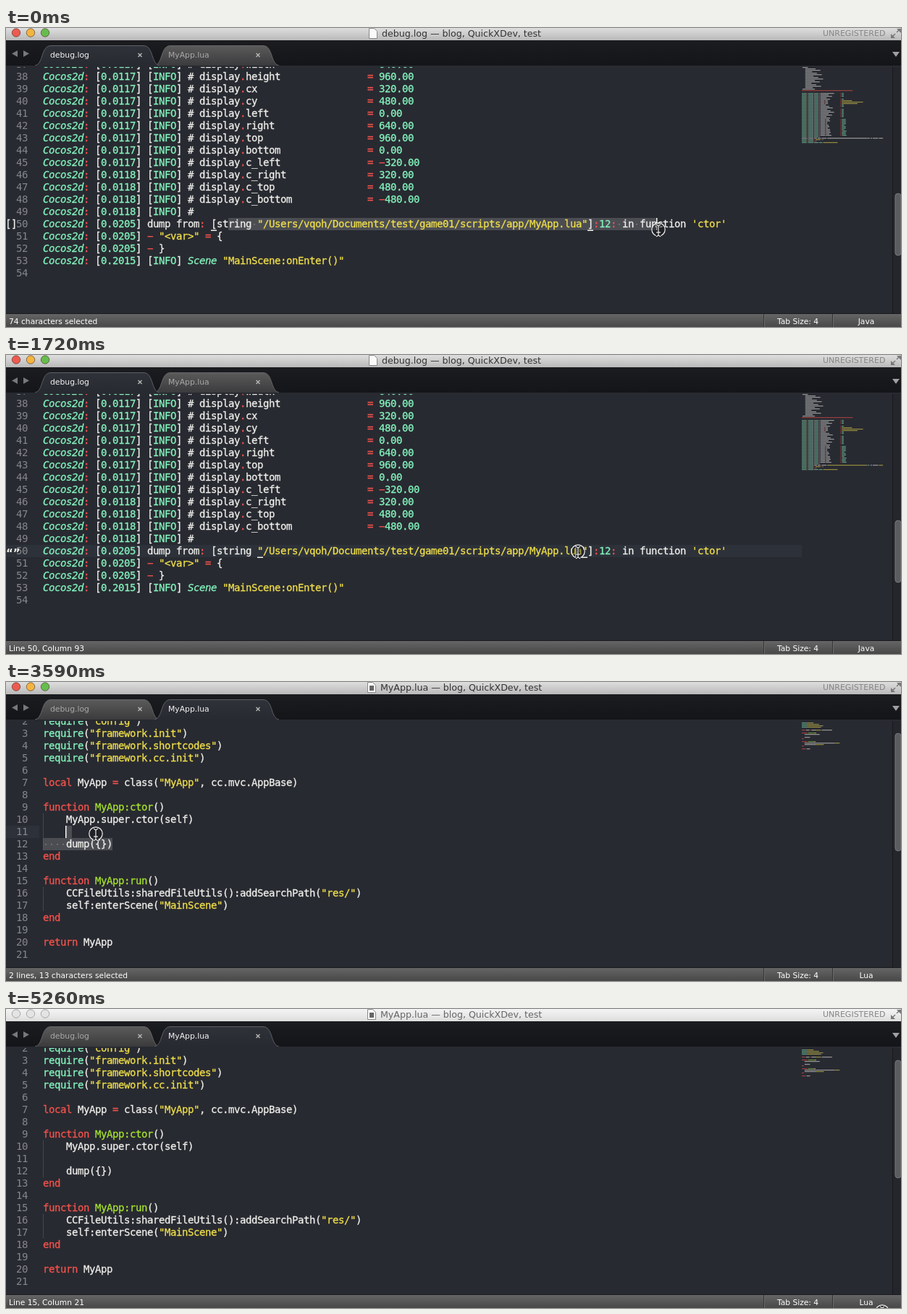
Recreate the animation shown at these times as an HTML page with a canvas. Size 1236x414 px, loop 5360 ms.

```html
<!DOCTYPE html>
<html lang="en">
<head>
<meta charset="utf-8">
<title>Editor: jump from log to code</title>
<style>
  html, body { margin: 0; width: 100%; height: 100%; overflow: hidden; background: #282a31; }
  canvas { display: block; }
</style>
</head>
<body>
<canvas id="stage" width="1236" height="414"></canvas>
<script>
const ctx = document.getElementById('stage').getContext('2d');
const LOOP = 5360, LEFT = 51, CHAR = 8, LINE = 17;
const MONO = '"DejaVu Sans Mono", monospace', UI = '"DejaVu Sans", sans-serif';
const BG = '#282a31', WHITE = '#eeeeea', RED = '#f2524b', MINT = '#83f3bd', YELLOW = '#eedd4a', LIME = '#a6e22e';

// Documents
const logLine = (time, text) => `Cocos2d: [${time}] ${text}`;
const display = (time, key, value) => logLine(time, `[INFO] # display.${key}`).padEnd(56) + '= ' + value;

const logLines = [];
for (let i = 0; i < 16; i++) logLines.push(' '.repeat(i % 15 ? 5 : 1) + 'x'.repeat(8 + i * 7 % 19));
logLines.push('='.repeat(74), '');
for (let i = 18; i < 36; i++) {
  logLines.push(i > 22 && i < 26
    ? logLine('0.0116', '[INFO] # device.path').padEnd(56) + '= "' + 'x'.repeat(29 - (i % 3) * 8) + '"'
    : logLine('0.0116', '[INFO] # ' + 'x'.repeat(8 + i * 5 % 13)).padEnd(56) + (i % 7 ? '= 640' : ''));
}
logLines.push(
  display('0.0117', 'width', '640.00'),
  display('0.0117', 'height', '960.00'),
  display('0.0117', 'cx', '320.00'),
  display('0.0117', 'cy', '480.00'),
  display('0.0117', 'left', '0.00'),
  display('0.0117', 'right', '640.00'),
  display('0.0117', 'top', '960.00'),
  display('0.0117', 'bottom', '0.00'),
  display('0.0117', 'c_left', '−320.00'),
  display('0.0118', 'c_right', '320.00'),
  display('0.0118', 'c_top', '480.00'),
  display('0.0118', 'c_bottom', '−480.00'),
  logLine('0.0118', '[INFO] #'),
  logLine('0.0205', 'dump from: [string "/Users/vqoh/Documents/test/game01/scripts/app/MyApp.lua"]:12: in function \'ctor\''),
  logLine('0.0205', '− "<var>" = {'),
  logLine('0.0205', '− }'),
  logLine('0.2015', '[INFO] Scene "MainScene:onEnter()"'),
  '');

const luaLines = `
require("config")
require("framework.init")
require("framework.shortcodes")
require("framework.cc.init")

local MyApp = class("MyApp", cc.mvc.AppBase)

function MyApp:ctor()
    MyApp.super.ctor(self)
    
    dump({})
end

function MyApp:run()
    CCFileUtils:sharedFileUtils():addSearchPath("res/")
    self:enterScene("MainScene")
end

return MyApp
`.split('\n');

const LOG = {
  name: 'debug.log', syntax: 'Java', lines: logLines, first: 37, top: 50, thumb: [229, 86], titleX: 519,
  pattern: /("[^"]*"|'[^']*')|(^Cocos2d|Scene(?= ))|(INFO|\b\d+(?:\.\d+)?)|([:.=−]+)/g,
  styles: [YELLOW, MINT, MINT, RED], italic: 1, guides: []
};
const LUA = {
  name: 'MyApp.lua', syntax: 'Lua', lines: luaLines, first: 2, top: 54, thumb: [71, 163], titleX: 517,
  pattern: /("[^"]*")|(\brequire\b)|((?<=function )[\w:]+)|(\b(?:local|function|end|return)\b|=)/g,
  styles: [YELLOW, MINT, LIME, RED], italic: -1, guides: [[10, 12], [16, 17]]
};

function tokenize(line, file) {
  const tokens = [];
  let at = 0;
  const plain = end => { if (end > at) tokens.push({ col: at, text: line.slice(at, end), color: WHITE }); };
  for (const m of line.matchAll(file.pattern)) {
    const kind = m.slice(1).findIndex(Boolean);
    plain(m.index);
    tokens.push({ col: m.index, text: m[0], color: file.styles[kind], italic: kind === file.italic });
    at = m.index + m[0].length;
  }
  plain(line.length);
  return tokens;
}
for (const file of [LOG, LUA]) file.tokens = file.lines.map(line => tokenize(line, file));

// Timeline: each entry changes part of the state at its time
const at = (line, col) => ({ caret: [line, col], sel: [], active: line, status: `Line ${line}, Column ${col + 1}` });
const steps = [
  [0, { file: LOG, caret: [50, 106], sel: [], band: null, active: 0, pair: [29, 94], mark: '[]', press: true,
        pointer: 'beam', focus: true, caretAlpha: 1 }],
  [370, { press: false }],
  [900, { ...at(49, 26), band: [0, 1099], press: true }],
  [1020, { press: false }],
  [1660, { ...at(50, 92), pair: [37, 93], mark: '“”', press: true }],
  [1780, { press: false }],
  [2200, { ...at(50, 91), press: true }],
  [2370, { caret: [50, 93], sel: [[50, 90, 93]], band: null, active: 0, pointer: 'arrow', status: '3 characters selected' }],
  [2480, { ...at(12, 0), file: LUA, pair: [], mark: '', active: 0, press: false, pointer: 'beam', caretAlpha: .4 }],
  [2780, { band: [50, 779] }],
  [3420, { ...at(12, 12), band: [0, 1099], press: true, caretAlpha: 1 }],
  [3530, { caret: [11, 4], sel: [[11, 4, 5], [12, 0, 12]], band: null, active: 11, status: '2 lines, 13 characters selected' }],
  [3940, { caret: [12, 4], sel: [[12, 4, 12]], active: 12, status: '8 characters selected' }],
  [4110, { press: false }],
  [4570, { ...at(15, 20), band: [0, 1099], press: true }],
  [4680, { press: false }],
  [5160, { press: true }],
  [5260, { focus: false, band: null, active: 0, caretAlpha: 0 }]
];
const path = [
  [0, 901, 279], [60, 901, 279], [370, 1000, 277], [550, 1000, 277], [900, 851, 247], [1190, 851, 249],
  [1660, 790, 272], [1780, 790, 272], [2250, 768, 268], [2780, 768, 272], [3020, 234, 259], [3310, 160, 232],
  [3420, 150, 226], [3590, 124, 210], [3880, 92, 222], [4110, 86, 224], [4290, 86, 224], [4460, 367, 273],
  [4680, 390, 276], [4790, 1174, 402], [4850, 1174, 402], [5260, 1210, 419], [LOOP, 1210, 419]
];

function pointerAt(t) {
  const i = path.findIndex(p => p[0] > t);
  const [t0, x0, y0] = path[i - 1], [t1, x1, y1] = path[i];
  const u = (t - t0) / (t1 - t0);
  return [Math.round(x0 + (x1 - x0) * u), Math.round(y0 + (y1 - y0) * u)];
}

function stateAt(t) {
  const state = Object.assign({}, ...steps.filter(s => s[0] <= t).map(s => s[1]));
  state.mouse = pointerAt(t);
  if (t < 900) {
    const from = 32;
    const to = t < 370 ? Math.min(118, Math.round((state.mouse[0] - LEFT) / CHAR)) : 118;
    state.caret = [50, to];
    state.sel = [[50, from, to]];
    state.status = `${to - from} characters selected`;
  }
  return state;
}

// Drawing helpers
function rect(x, y, w, h, color) { ctx.fillStyle = color; ctx.fillRect(x, y, w, h); }
function vertical(y0, y1, ...colors) {
  const g = ctx.createLinearGradient(0, y0, 0, y1);
  colors.forEach((c, i) => g.addColorStop(i / (colors.length - 1), c));
  return g;
}
function label(text, x, y, size, color, align = 'left', font = UI, style = '') {
  ctx.font = `${style} ${size}px ${font}`;
  ctx.textAlign = align;
  ctx.fillStyle = color;
  ctx.fillText(text, x, y);
}
function code(text, x, y, color, italic) {
  ctx.letterSpacing = '-0.43px';
  label(text, x, y, 14, color, 'left', MONO, italic ? 'italic' : '');
  ctx.strokeStyle = color;
  ctx.lineWidth = .3;
  ctx.strokeText(text, x, y);
  ctx.letterSpacing = '0px';
}
function shape(points, fill, stroke, width = 1) {
  ctx.beginPath();
  points.forEach(([x, y]) => ctx.lineTo(x, y));
  ctx.closePath();
  if (fill) { ctx.fillStyle = fill; ctx.fill(); }
  if (stroke) { ctx.strokeStyle = stroke; ctx.lineWidth = width; ctx.stroke(); }
}
function strokeLine(x0, y0, x1, y1, color, width = 1) {
  ctx.beginPath();
  ctx.moveTo(x0, y0);
  ctx.lineTo(x1, y1);
  ctx.strokeStyle = color;
  ctx.lineWidth = width;
  ctx.stroke();
}

function drawTitle({ file, focus }) {
  rect(0, 0, 1236, 17, focus ? vertical(0, 17, '#dedede', '#b9b9b9') : vertical(0, 17, '#f4f4f4', '#dedede'));
  const lights = focus ? ['#ee5a50', '#f4b53f', '#66bd4e'] : ['#e4e4e4', '#e4e4e4', '#e4e4e4'];
  lights.forEach((color, i) => {
    ctx.beginPath();
    ctx.arc(14 + i * 20, 6.5, 5.7, 0, 7);
    ctx.fillStyle = color;
    ctx.fill();
    ctx.strokeStyle = focus ? 'rgba(70,40,30,.6)' : '#a5a5a5';
    ctx.lineWidth = 1;
    ctx.stroke();
  });
  const x = file.titleX - 17.5;
  shape([[x, .5], [x + 7, .5], [x + 11, 4.5], [x + 11, 14.5], [x, 14.5]], '#fafafa', '#888');
  if (file === LUA) rect(x + 2.5, 5, 6, 7, '#666');
  label(file.name + ' — blog, QuickXDev, test', file.titleX, 12, 12.6, focus ? '#333' : '#666');
  label('UNREGISTERED', 1128, 11, 11, '#858585');
  const gray = '#777';
  strokeLine(1223, 13, 1228, 8, gray, 1.5);
  strokeLine(1230, 6, 1235, 1, gray, 1.5);
  shape([[1222, 8], [1222, 14], [1228, 14]], gray);
  shape([[1230, 1], [1236, 1], [1236, 7]], gray);
}

function drawTab(x, w, name, textX, closeX, active) {
  ctx.beginPath();
  ctx.moveTo(x, 52);
  ctx.bezierCurveTo(x + 12, 50, x + 8, 24.5, x + 22, 24.5);
  ctx.lineTo(x + w - 22, 24.5);
  ctx.bezierCurveTo(x + w - 8, 24.5, x + w - 12, 50, x + w, 52);
  ctx.fillStyle = active ? vertical(24, 52, '#30323a', BG) : vertical(24, 52, '#5b5b5b', '#3b3b3d');
  ctx.fill();
  ctx.strokeStyle = active ? '#5e6067' : '#66666a';
  ctx.lineWidth = 1;
  ctx.stroke();
  label(name, textX, 41, 10.8, active ? '#f4f4f4' : '#a9a9a9');
  strokeLine(closeX - 2.5, 35, closeX + 2.5, 40, '#b5b5b5', 1.4);
  strokeLine(closeX + 2.5, 35, closeX - 2.5, 40, '#b5b5b5', 1.4);
}

function drawTabs({ file }) {
  rect(0, 17, 1236, 36, vertical(17, 53, '#1b1c20', '#141519'));
  const first = active => drawTab(40, 172, 'debug.log', 61, 185, active);
  const second = active => drawTab(205, 172, 'MyApp.lua', 224, 348, active);
  if (file === LOG) { second(false); first(true); } else { first(false); second(true); }
  rect(0, 52, 1236, 2, BG);
  shape([[8, 35.5], [16, 31], [16, 40]], '#77787a');
  shape([[32, 35.5], [24, 31], [24, 40]], '#77787a');
  shape([[1224, 33], [1234, 33], [1229, 40]], '#a0a0a0');
}

function drawMinimap({ file, sel }) {
  file.tokens.forEach((tokens, i) => {
    const selected = sel.some(s => s[0] === i + 1);
    for (const { col, text, color } of tokens) {
      ctx.globalAlpha = .55;
      for (const word of text.matchAll(/\S+/g)) {
        rect(1099 + (col + word.index) * .95, 54 + i * 2, word[0].length * .95, 1.2, selected ? WHITE : color);
      }
    }
  });
  ctx.globalAlpha = 1;
}

function drawEditor(state) {
  const { file, caret, sel, band, active, pair, mark, caretAlpha } = state;
  const center = n => file.top + (n - file.first) * LINE;
  const colX = col => LEFT + col * CHAR;
  ctx.save();
  ctx.beginPath();
  ctx.rect(0, 53, 1236, 343);
  ctx.clip();
  rect(0, 53, 1236, 343, BG);
  if (active) rect(0, center(active) - 8, 46, LINE, '#2d3139');
  if (band) rect(band[0], center(caret[0]) - 8, band[1] - band[0], LINE, '#2d3139');
  for (const [line, from, to] of sel) rect(colX(from), center(line) - 8, (to - from) * CHAR, LINE, '#4b4d53');

  for (const [from, to] of file.guides) {
    for (let y = center(from) - 8; y < center(to) + 9; y += 2) rect(LEFT, y, 1, 1, '#60636a');
  }
  for (let n = file.first; n <= file.lines.length; n++) {
    const y = center(n) + 5;
    ctx.letterSpacing = '-0.43px';
    label(n, 30, y, 14, '#85878c', 'right', MONO);
    ctx.letterSpacing = '0px';
    for (const token of file.tokens[n - 1]) code(token.text, colX(token.col), y, token.color, token.italic);
  }
  for (const [line, from, to] of sel) {
    for (let col = from; col < to; col++) {
      if (file.lines[line - 1][col] === ' ') rect(colX(col) + 3, center(line), 2, 1.5, '#77797f');
    }
  }
  for (const col of pair) rect(colX(col), center(50) + 8.5, 8, 1.5, WHITE);
  if (mark === '[]') code('[]', -1, center(50) + 5, WHITE);
  if (mark === '“”') label(mark, 0, center(50) + 9, 15, WHITE, 'left', UI, 'bold');
  ctx.globalAlpha = caretAlpha;
  rect(colX(caret[1]) - 1, center(caret[0]) - 8, 1.5, LINE, '#f8f8f2');
  ctx.globalAlpha = 1;
  drawMinimap(state);
  rect(1224, 53, 12, 343, '#24262b');
  rect(1224, 53, 1, 343, '#18191d');
  ctx.beginPath();
  ctx.roundRect(1228, file.thumb[0], 8, file.thumb[1], 4);
  ctx.fillStyle = '#5b5c60';
  ctx.fill();
  ctx.strokeStyle = '#77787b';
  ctx.lineWidth = 1;
  ctx.stroke();
  ctx.restore();
}

function drawStatus({ file, status }) {
  rect(0, 396, 1236, 18, vertical(396, 414, '#656565', '#484848'));
  rect(0, 395, 1236, 1, '#1a1b1e');
  for (const x of [1046, 1141]) {
    rect(x, 396, 1, 18, '#343434');
    rect(x + 1, 396, 1, 18, '#6c6c6c');
  }
  label(status, 4, 410, 10.7, '#fff');
  label('Tab Size: 4', 1093.5, 410, 10.7, '#fff', 'center');
  label(file.syntax, 1188, 410, 10.7, '#fff', 'center');
}

function drawPointer({ mouse: [x, y], press, pointer }) {
  if (press) {
    ctx.beginPath();
    ctx.arc(x, y, 9.2, 0, 7);
    ctx.fillStyle = 'rgba(20,20,24,.35)';
    ctx.fill();
    ctx.strokeStyle = '#f2f2f2';
    ctx.lineWidth = 1.2;
    ctx.stroke();
  }
  ctx.save();
  ctx.translate(x, y);
  if (pointer === 'arrow') {
    shape([[-1, 0], [-1, 14], [2, 11], [4.5, 17], [7, 16], [4.5, 10.5], [9, 10.5]], '#111', '#eee', 1.2);
  } else {
    for (const [color, width] of [['#17181b', 3], ['#f0f0f0', 1.2]]) {
      strokeLine(0, -5, 0, 8, color, width);
      strokeLine(-3, 4, 3, 4, color, width);
      for (const side of [-1, 1]) {
        strokeLine(0, -5, 3 * side, -7, color, width);
        strokeLine(0, 8, 3 * side, 10, color, width);
      }
    }
  }
  ctx.restore();
}

function frame(now) {
  const state = stateAt(now % LOOP);
  drawEditor(state);
  drawTabs(state);
  drawTitle(state);
  drawStatus(state);
  drawPointer(state);
  requestAnimationFrame(frame);
}
requestAnimationFrame(frame);
</script>
</body>
</html>
```
